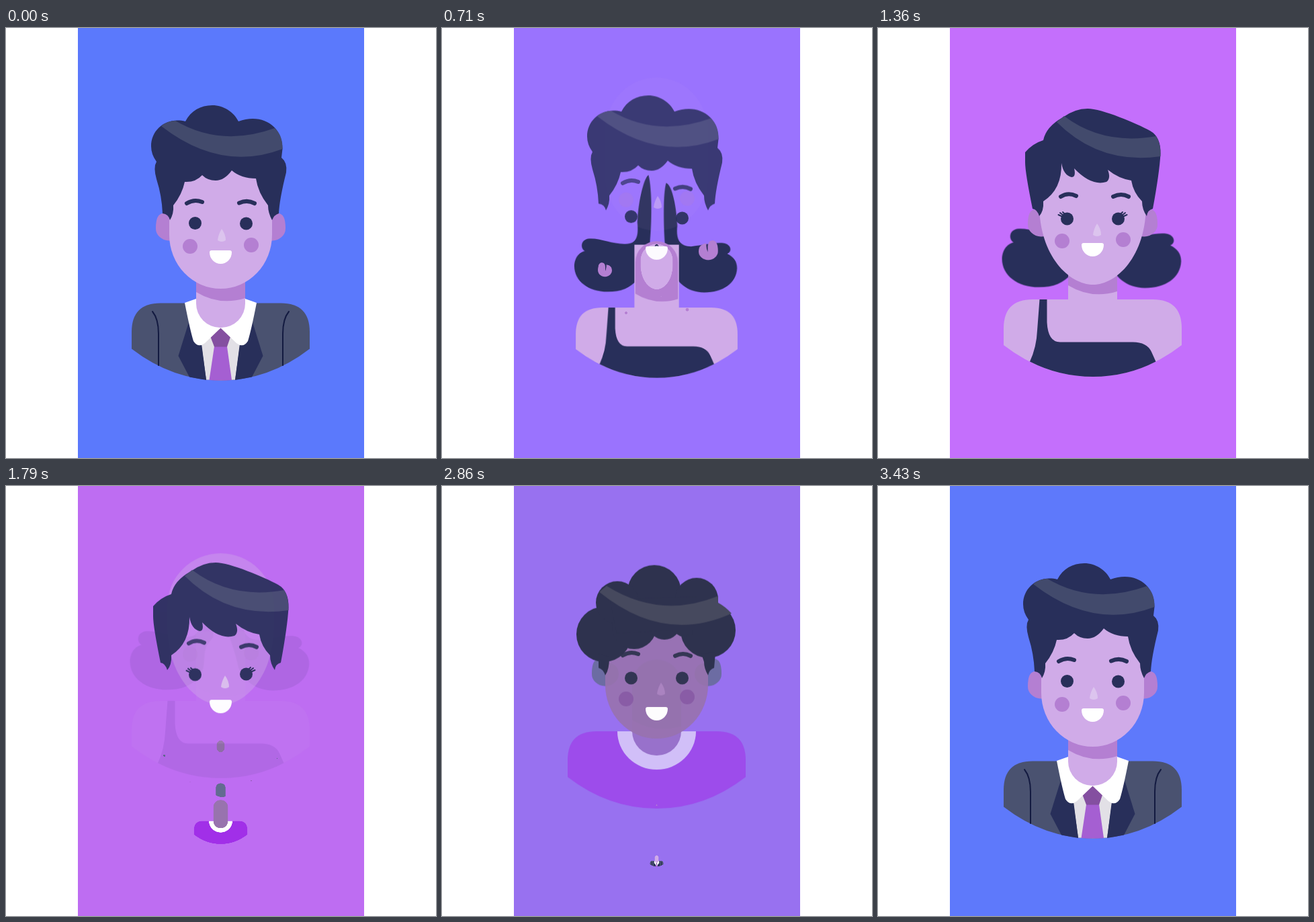
An HTML page that plays this animation: 640 px wide and 640 px high, repeating every 3500 ms.

```html
<!DOCTYPE html>
<html lang="en">
<head>
<meta charset="utf-8">
<title>Changing portraits</title>
<style>
html, body { margin: 0; width: 100%; height: 100%; overflow: hidden; background: #fff; }
svg { display: block; width: 100%; height: 100%; }

.backdrop { animation: backdrop 3500ms linear infinite; }
.leave { animation: leave 3500ms linear infinite; }
.enter { animation: enter 3500ms linear infinite; }

@keyframes backdrop {
  0%, 4.77% { fill: #5b79fc; }
  31.06%, 35.37% { fill: #c66fff; }
  61.66%, 72.57% { fill: #b96cea; }
  98.86%, 100% { fill: #5b79fc; }
}
/* Each part hides by scale while its rise is being reset. */
@keyframes enter {
  0% { transform: scale(0); animation-timing-function: cubic-bezier(.333, 0, .667, 1); }
  10.57% { transform: scale(1); }
  60% { transform: scale(1); animation-timing-function: step-end; }
  60.01%, 100% { transform: scale(0); }
}
@keyframes leave {
  0% { transform: translateY(0); opacity: 1; animation-timing-function: cubic-bezier(.333, 0, .667, 1); }
  13.14% { transform: translateY(-92px); opacity: 0; }
  40% { transform: translateY(-92px); opacity: 0; animation-timing-function: step-end; }
  40.01%, 100% { transform: translateY(0); opacity: 1; }
}
</style>
</head>
<body>
<svg viewBox="0 0 640 640">
  <rect class="backdrop" x="107" y="0" width="426" height="640" fill="#5b79fc"/>
  <g id="cast"></g>
</svg>
<script>
const LOOP = 3500;
const path = (d, fill) => `<path d="${d}" fill="${fill}"/>`;
const dot = (x, y, r, fill) => `<circle cx="${x}" cy="${y}" r="${r}" fill="${fill}"/>`;
const line = (d, color, width) =>
  `<path d="${d}" fill="none" stroke="${color}" stroke-width="${width}" stroke-linecap="round"/>`;
const mirror = art => `<g transform="matrix(-1 0 0 1 639 0)">${art}</g>`;
const move = (x, y, art) => `<g transform="translate(${x} ${y})">${art}</g>`;

// A part grows out of (x, y) from time start, and rises away from time end.
const part = (art, x, y, start, end) =>
  `<g class="leave" style="animation-delay:${end % LOOP - LOOP}ms">` +
  `<g class="enter" style="animation-delay:${start % LOOP - LOOP}ms;transform-origin:${x}px ${y}px">${art}</g></g>`;

const torso = (top, fill) => move(0, top,
  path("M187 68V43Q187 0 230 0H409Q452 0 452 43V68Q391 115 320 115Q248 115 187 68Z", fill));
const neck = (bottom, fill) =>
  `<rect x="283" y="301" width="73" height="${bottom - 301}" rx="36" fill="${fill}"/>`;
const shadow = (y, fill) => move(0, y,
  path("M283 -14Q318 7 356 -5V-68A36.5 36 0 0 0 283 -68Z", fill));
const ear = (y, fill) => move(243, y,
  path("M-9 -20Q0 -20 1 -8V4Q4 -2 4 -14Q20 -12 20 3A20 18 0 0 1 -20 2Q-20 -20 -9 -20Z", fill));
const roundFace = (bottom, fill) =>
  `<rect x="243" y="${bottom - 228}" width="153" height="228" rx="76.5" ry="80" fill="${fill}"/>`;
const nose = (x, y, fill) => move(x, y, path("M0 0Q6 8 6 17Q0 21 -6 17Q-5 8 0 0Z", fill));
const mouth = y => move(0, y, path("M306 0H333Q336 0 336 3A16.5 17 0 0 1 303 3Q303 0 306 0Z", "#fff"));

const DARK = "#282f5a", SKIN = "#d0abe8", ROSE = "#b47fd2", PALE = "#dcc4ee";
const INK = "#2e334e", BROWN = "#9873ae", SLATE = "#636b91";

// Man in a suit
const collar = path("M266 409L283 403Q285 440 320 446L296 469Q286 477 279 466Q274 450 266 409Z", "#fff");
const lapel = path("M272 438L256.500 488L273 519.500L298 524L291 470Z", DARK);
const sleeve = line("M218 422Q227 433 227 455V502", "#131a40", 2);
const suit =
  torso(409.500, "#4a5270") +
  path("M320 440L290 466L298 523.500Q320 525 341 523.500L349 466Z", "#e2e0e6") +
  lapel + mirror(lapel) + sleeve + mirror(sleeve) +
  path("M310 474H329L336 524Q319 525 302.500 524Z", "#a55fd2") +
  path("M319.500 446L304.500 460L310 474.500H329L334 460Z", "#844fa0") +
  collar + mirror(collar) + neck(446, SKIN);
const suitHair =
  path("M233 276Q232 250 224 225Q219 207 224 199Q216 188 216 176C216 150 240 132 267 139" +
    "C275 123 290 115 307 115C324 115 339 125 346 139C380 126 412 145 411.500 180L410 193" +
    "Q419 200 417 215Q407 255 406 276Q399 278 396 286Q390 275 390 264Q375 245 372 224" +
    "Q350 224 336 212Q325 227 312 227Q300 227 292 219Q282 230 266 229Q262 248 249 264" +
    "Q250 276 244 286Q242 277 233 276Z", DARK) +
  path("M231 146Q240 138 252 138Q320 178 400 149Q412 160 411.500 180Q320 215 231 146Z", "#424a6c");

const man = [
  part(suit, 319.500, 570, 2799, 210),
  part(shadow(407, ROSE), 319.500, 478, 2827, 210),
  part(ear(296, ROSE), 243, 412, 2871, 260),
  part(mirror(ear(296, ROSE)), 396, 412, 2888, 260),
  part(roundFace(388, SKIN), 319.500, 399, 2871, 320),
  part(dot(274, 325, 11, ROSE), 274, 450, 2879, 400),
  part(dot(365, 323, 11, ROSE), 365, 450, 2890, 400),
  part(nose(321, 299, PALE), 321, 410, 2890, 471),
  part(suitHair, 319.500, 327, 2957, 595),
  part(dot(281.500, 290.500, 9.500, DARK), 281.500, 404, 2983, 618),
  part(dot(357.500, 291, 9.500, DARK), 357.500, 404, 3015, 627),
  part(line("M269 261Q280 254 292 259", DARK, 6), 280, 412, 2940, 535),
  part(line("M347 260.500Q359 255 370 261", DARK, 6), 359, 412, 2950, 567),
  part(mouth(331), 319.500, 465, 3049, 639)
];

// Woman with pigtails
const pigtails = `<g transform="translate(319.500 460) scale(1.075) translate(-319.500 -460)">` +
  path("M307 213C313 235 312 290 309 318L300 330C294 345 300 360 290 372C280 385 265 391 245 391" +
    "C215 391 194 374 194 352C194 338 203 330 210 329C203 325 203 311 217 310C232 309 252 318 270 318" +
    "C290 319 292 305 290 285C292 250 300 218 307 213Z", DARK) +
  path("M334 225C342 228 349 255 351 290C348 315 358 322 372 322C390 320 410 315 422 317" +
    "C433 319 435 330 427 333C437 338 442 345 442 355C441 378 420 392 392 392C365 392 350 375 344 360" +
    "C340 340 334 325 332 318C330 290 329 240 334 225Z", DARK) + `</g>`;
const dress =
  torso(404, SKIN) + `<rect x="283" y="301" width="73" height="115" fill="${SKIN}"/>` +
  path("M240.500 404H251.500V438Q253 467.500 271 467.500H378Q400 467 407 482L413.500 496.500" +
    "Q370 519 320 519Q270 519 226 496.500Q236 475 237 450Z", DARK);
const longFace = path("M240 262C240 340 285 382 320 382C355 382 399 340 399 262V235A79.500 79 0 0 0 240 235Z", SKIN);
const sweptHair =
  path("M219 185Q230 172 246 167Q250 147 275 133Q293 120 312 120C333 120 385 142 405 153" +
    "Q421 162 420.500 187Q419 215 409 269Q401 271 400 280Q393 270 393 258Q380 245 377 227" +
    "Q358 224 342 211Q347 224 340 229Q318 236 292 209Q295 222 288 222Q276 219 273 201" +
    "Q274 240 246 258Q247 272 240 280Q237 270 230 269Q219 215 219 200Z", DARK) +
  path("M266 140L277 131Q335 175 414 161Q421 172 420.500 191Q330 204 266 140Z", "#424a6c");
const lashEye = dot(281.500, 284, 9.500, DARK) +
  line("M275 281L268.500 278M276 279L271 275M278 277L275 274", DARK, 2);

const woman = [
  part(pigtails, 319.500, 460, 410, 1422),
  part(dress, 319.500, 537, 410, 1413),
  part(shadow(397, ROSE), 319.500, 478, 425, 1413),
  part(ear(290, ROSE), 242, 435, 521, 1420),
  part(mirror(ear(290, ROSE)), 397, 435, 470, 1420),
  part(longFace, 319.500, 392, 577, 1528),
  part(dot(274, 317, 11, ROSE), 274, 448, 610, 1490),
  part(dot(365, 315, 11, ROSE), 365, 448, 600, 1490),
  part(nose(326, 291, PALE), 326, 410, 640, 1703),
  part(sweptHair, 319.500, 327, 676, 1719),
  part(lashEye, 281.500, 400, 720, 1739),
  part(mirror(lashEye), 357.500, 400, 750, 1733),
  part(line("M272 251Q283 244 295 250", DARK, 6), 283, 408, 700, 1666),
  part(line("M350 251Q362 245 373 251", DARK, 6), 362, 408, 710, 1690),
  part(mouth(320), 319.500, 460, 810, 1753)
];

// Man in a T-shirt
const shirt =
  torso(406, "#a12fe8") + path("M261 406A58.500 57 0 0 0 378 406Z", "#fff") + neck(442, BROWN);
const curls =
  [[241, 221, 41], [396, 215, 41], [316, 158, 40], [261, 174, 32], [379, 169, 32], [286, 210, 33], [331, 205, 24]]
    .map(c => dot(...c, INK)).join("") +
  path("M250 170L380 165L372 222L355 224L340 215L260 220Z", INK) +
  path("M233 250V271Q240 273 243 282Q249 274 249 255Z", INK) +
  path("M407 248L405 271Q398 273 396 282Q390 272 390 262L386 250Z", INK) +
  path("M234 158L245 149Q325 199 411 164V174Q422 180 431 190Q330 236 234 158Z", "#464a5e");

const youth = [
  part(shirt, 319.500, 538, 1657, 2648),
  part(shadow(403, SLATE), 319.500, 478, 1685, 2648),
  part(ear(294, SLATE), 235, 410, 1729, 2736),
  part(mirror(ear(294, SLATE)), 404, 410, 1746, 2736),
  part(roundFace(384, BROWN), 319.500, 397, 1729, 2777),
  part(dot(274, 325, 11, "#885ba5"), 274, 448, 1737, 2777),
  part(dot(365, 322, 11, "#885ba5"), 365, 448, 1730, 2777),
  part(nose(326, 302, "#ad86c2"), 326, 410, 1740, 2770),
  part(curls, 319.500, 327, 1815, 2845),
  part(dot(281.500, 290, 9.500, INK), 281.500, 403, 1841, 2802),
  part(dot(357.500, 290, 9.500, INK), 357.500, 406, 1885, 2802),
  part(line("M269 258Q280 251 292 256", INK, 6), 280, 412, 1770, 2790),
  part(line("M347 258Q359 252 370 258", INK, 6), 359, 412, 1790, 2795),
  part(mouth(331), 319.500, 465, 1937, 2820)
];

document.getElementById("cast").innerHTML = [...youth, ...woman, ...man].join("");
</script>
</body>
</html>
```
